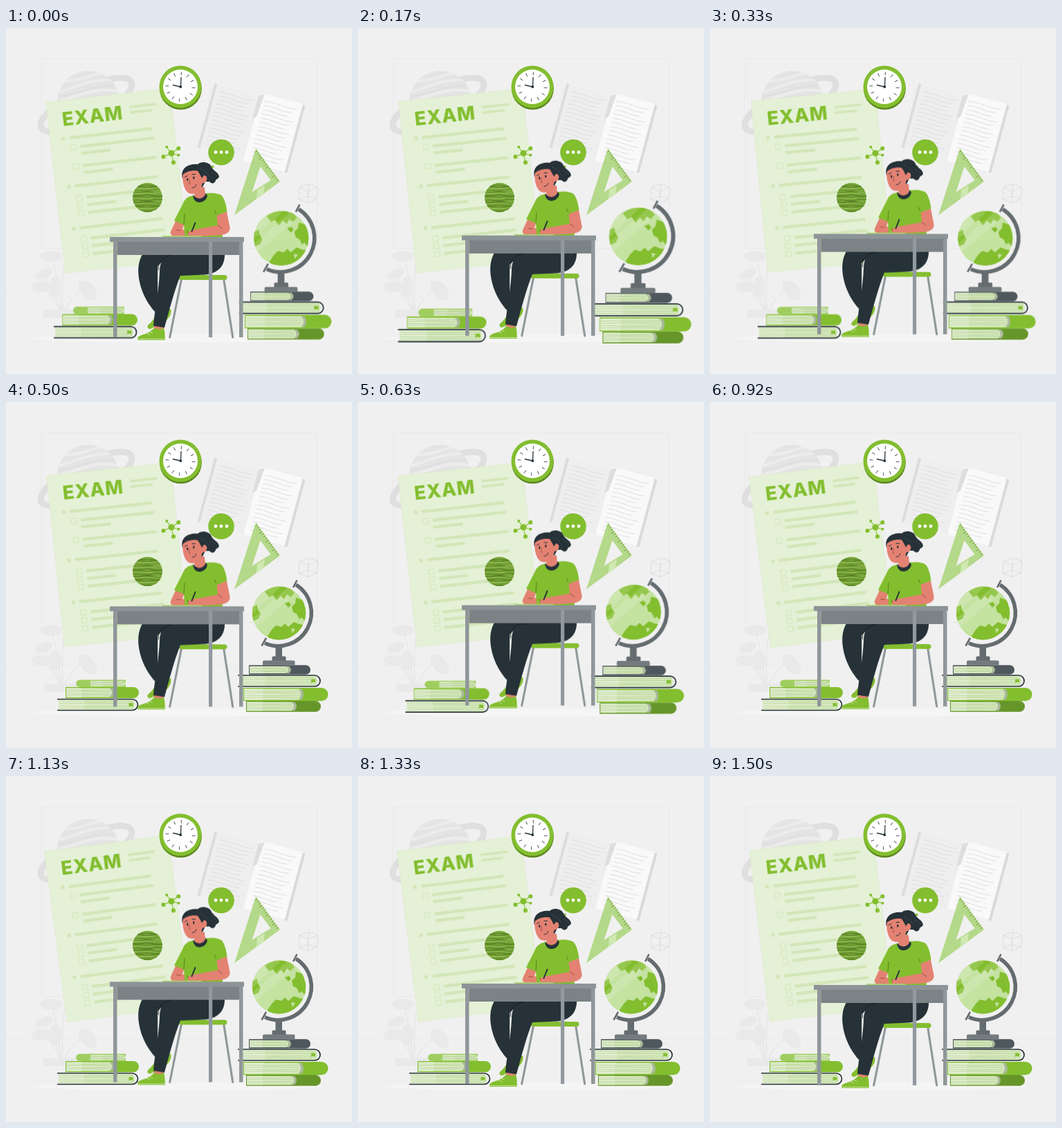
These frames come from a looping animation (500 px wide and 500 px high, 1.54 s). An HTML page:

```html
<!DOCTYPE html>
<html lang="en">
<head>
<meta charset="utf-8">
<title>Exam study</title>
<style>
  html, body { margin: 0; width: 100%; height: 100%; overflow: hidden; background: #f0f0f0; }
  svg { display: block; width: 100vw; height: 100vh; }
  #paper { transform-origin: 161.2px 220.7px; }
  #props { transform-origin: 270px 352.5px; }
  .title { font: 800 27.5px Inter, "Open Sans", sans-serif; letter-spacing: .9px; fill: #83be2f; }
  .g { fill: #83be2f; }
  .dark { fill: #263238; }
  .skin { fill: #e38272; }
  .ln { fill: none; stroke: #263238; stroke-linecap: round; }
</style>
</head>
<body>
<svg viewBox="0 0 500 500">
  <defs>
    <clipPath id="ballClip"><circle cx="204.5" cy="245" r="21.5"/></clipPath>
    <clipPath id="globeClip"><circle cx="394.5" cy="305" r="38.7"/></clipPath>
    <clipPath id="planetClip"><circle cx="119" cy="107" r="45"/></clipPath>
  </defs>

  <!-- backdrop -->
  <g fill="none" stroke="#e9e9e9">
    <path d="M50 44.5H449.5V318.5H50Z"/>
    <path d="M55 49V318M262 120V318M0 380.5H500" stroke="#ebebeb"/>
  </g>
  <g fill="#e4e4e4">
    <ellipse cx="116" cy="111" rx="73" ry="23" transform="rotate(-27 116 111)" fill="none" stroke="#dfdfdf" stroke-width="9"/>
    <circle cx="119" cy="107" r="45"/>
    <g clip-path="url(#planetClip)" fill="none" stroke="#ececec" stroke-width="4">
      <path d="M75 92C100 88 120 70 165 76M75 106C105 100 125 84 165 92M85 76C105 78 125 66 145 64"/>
      <path d="M75 99C105 96 130 80 165 84" stroke="#dedede" stroke-width="2"/>
    </g>
  </g>
  <g id="notebook" transform="translate(305 82) rotate(15)"></g>
  <g fill="#e9e9e9">
    <path d="M80 410C78 380 70 345 66 332M82 410C82 370 78 345 92 320M80 410C74 392 62 366 52 356M84 410C92 392 105 378 118 376M78 408C70 390 60 378 50 374" fill="none" stroke="#e2e2e2"/>
    <ellipse cx="65" cy="330" rx="16" ry="8"/>
    <ellipse cx="55" cy="355" rx="13" ry="7" transform="rotate(-20 55 355)"/>
    <ellipse cx="71" cy="374" rx="9" ry="15"/>
    <ellipse cx="50" cy="374" rx="13" ry="8"/>
    <ellipse cx="118" cy="379" rx="17" ry="10" transform="rotate(50 118 379)"/>
    <path d="M54 407H109V419H54Z"/>
  </g>
  <path d="M424 230L438 225.5L451 230L449 247L436 253L423 248ZM424 230L437 236L451 230M437 236L436 253M438 225.5L436 243L423 248M436 243L449 247" fill="none" stroke="#dedede"/>
  <ellipse cx="250" cy="448.5" rx="209" ry="6" fill="#f5f5f5"/>

  <g id="paper"><g id="sheet" transform="translate(57.5 107.5) rotate(-6.6)">
    <path d="M0 0H180V248.6H0Z" fill="#e4f1d6" stroke="#d9e8c4" stroke-width=".6"/>
    <text class="title" x="20.5" y="36.5">EXAM</text>
  </g></g>

  <!-- floating objects -->
  <g id="clock">
    <circle cx="252.4" cy="87.5" r="30.5" fill="#5b8620"/>
    <circle class="g" cx="252" cy="85" r="30.5"/>
    <circle cx="252" cy="85" r="25" fill="#fff"/>
    <path class="ln" d="M252.5 85L253 71.5M252 85L241.5 82.5" stroke-width="1.3"/>
    <circle class="dark" cx="252.3" cy="85" r="1.9"/>
  </g>
  <g id="ball" clip-path="url(#ballClip)">
    <circle cx="204.5" cy="245" r="21.5" fill="#78a838"/>
  </g>
  <g class="g">
    <path d="M239 181L227.5 186M239 181L249 174M239 181L242 194M239 181L232 172M239 181L250 184" stroke="#83be2f" stroke-width="1.1"/>
    <circle cx="239" cy="181" r="4.6"/><circle cx="227.5" cy="186" r="3"/>
    <circle cx="249.3" cy="174" r="3"/><circle cx="242" cy="194.3" r="3.1"/>
    <circle cx="232.3" cy="172" r="2"/><circle cx="249.5" cy="183.7" r="2"/>
  </g>
  <circle class="g" cx="311" cy="179.7" r="18.8"/>
  <circle class="g" cx="298.5" cy="200.5" r="2.1"/>
  <g fill="#fff"><circle cx="303" cy="179.5" r="2.4"/><circle cx="311" cy="179.5" r="2.4"/><circle cx="319" cy="179.5" r="2.4"/></g>
  <g id="ruler">
    <path d="M361 174L396 222L330 270.5ZM367.5 200L382.5 220L355.500 237Z" fill="#b4d98a" fill-rule="evenodd"/>
    <path d="M363 234L374 227.5L372 240L362 247Z" fill="#cfe8b0"/>
  </g>

  <g id="props">
    <g id="books"></g>
    <path d="M389.5 351H399V372H389.5Z" fill="#646c6f"/>
    <rect x="384.5" y="367.5" width="20" height="8" rx="1.5" fill="#646c6f"/>
    <rect x="371" y="373.6" width="46.5" height="7.3" rx="2" fill="#737b7e"/>
    <path d="M419 264A48 48 0 0 1 374 348.5" fill="none" stroke="#646c6f" stroke-width="5.5"/>
    <path d="M420.5 257.5L415 268M369.5 352.5L376 341" stroke="#646c6f" stroke-width="2.6"/>
    <g clip-path="url(#globeClip)">
      <circle cx="394.5" cy="305" r="38.7" fill="#c4e2a0"/>
      <g class="g">
        <path d="M374 274C386 265 402 264 412 270L417 276L411 282L406 278L402 285L397 280L391 287L386 279L380 282Z"/>
        <path d="M419 283L429 286C436 298 436 310 433 318L427 311L424 314L420 306L415 304L413 296L418 291Z"/>
        <path d="M403 291L409 289L412 293L408 297Z"/>
        <path d="M378 338L384 329L390 323L398 325L403 320L408 325L416 318L424 321L430 322L420 345H380Z"/>
        <path d="M354 297L363 293L364 300L368 306L365 313L357 317Z"/>
        <path d="M412 327L418 328L414 334Z" fill="#c4e2a0"/>
      </g>
      <path d="M350 312L402 262H350ZM356 330L428 268L414 262L350 318Z" fill="#fff" opacity=".15"/>
    </g>
  </g>

  <g id="student">
    <path d="M253.500 363L236.700 447M314.700 363L327.700 447" stroke="#8f979a" stroke-width="3.1" stroke-linecap="round"/>
    <rect class="g" x="249.500" y="357" width="70" height="7" rx="3.5"/>
    <!-- legs and shoes -->
    <path class="g" d="M228 408L238 406C240 413 236 419 228 426L208 435C203 434 203 430 209 426L217 416Z"/>
    <path class="dark" d="M199 324C189 338 190 356 194 371C198 387 207 401 215 410L219 404C219.5 385 219 362 219.300 344L240 324Z"/>
    <path class="skin" d="M214 428H229L228 436H214Z"/>
    <path class="g" d="M214 433.5L222 435.5L228 433.5C230 439 229.5 445 230 451H190.5C188.5 447.5 192 444.5 198 443C206 441 210 437.5 214 433.5Z"/>
    <path d="M190 449.5H230M203 441L208 444M207 438.5L212 441.5" fill="none" stroke="#d3e9b4" stroke-width=".9"/>
    <path class="dark" d="M240 324H316C317 342 309 354 288 356.5L252 358C243 380 236 408 229 433L213 430.5C215 405 221 380 222 352C222 338 228 329 240 324Z"/>
    <path d="M220.500 350C219 338 227 331 240 328" fill="none" stroke="#11191d" stroke-width=".8"/>
    <!-- torso and arms -->
    <path class="skin" d="M246 277L258 281L255 291L263 293L268 301H242C237 299 237 296 239 292Z"/>
    <path class="g" d="M272 242C263 243 258 247 256 253L243 278.500L257 284.500L258.500 302H313L309 270L319.500 265.500C318 254 315 243 309 240.500C303 238 295 238 287 239Z"/>
    <path d="M257 284L258 268M304 269L301 263" fill="none" stroke="#4d7319" stroke-width=".8"/>
    <path class="skin" d="M304.500 271L319 265.500L323.500 288C324.500 295 318 298.500 309 299.500L270 301.500L262 299C263 294 268 291 275 291L306 285Z"/>
    <path d="M306 285L313 290M246 292L253 292.5M264 297L262 293" fill="none" stroke="#8e4239" stroke-width=".8"/>
    <path class="ln" d="M273.5 281.5L268.5 294" stroke-width="2"/>
    <!-- head -->
    <path class="dark" d="M270 241C274 247 284 246 288 238.5L291 242C289 254 271 257 270 241Z"/>
    <path class="skin" d="M273 230H287L288 241C284 248 275 248 272 242Z"/>
    <path class="dark" d="M255 217C251.500 205 261 195.500 277 197C281 192.500 294 192.500 297 201C300 207 307 208 308 215C306 219 304 218 303 220C302 225 297 226 294 222L288 222L284 230Z"/>
    <path class="skin" d="M255.500 212C254.500 221 257 231 261 236C266 242.500 276 240 281 233L284 224C291 225 293 213 286 213L283 217C281 213 279 209 277 206.500C270 205 261 207 255.500 212Z"/>
    <path d="M280 203C285 205 290 208 293 214M296 208C300 210 304 212 305 215" fill="none" stroke="#4a555a" stroke-width=".6"/>
    <ellipse class="dark" cx="262.3" cy="219" rx="1.2" ry="1.9"/>
    <ellipse class="dark" cx="271.3" cy="216.5" rx="1.2" ry="1.9"/>
    <path class="ln" d="M258.5 215.5L262 213.5M269 211.5L273.5 211.5M269 231C272 231 274 229 275 226.5" stroke-width="1"/>
    <path d="M265.5 219L264.5 225.5L267 225" fill="none" stroke="#a34d42" stroke-width=".8"/>
    <!-- desk -->
    <path d="M226 300.3H283V302.5H226Z" fill="#a9d071"/>
    <path d="M155 309H160.5V447H155ZM337 309H342.5V447H337Z" fill="#8f979a"/>
    <path d="M160.5 309H337V328H160.5Z" fill="#7b8386"/>
    <path d="M293 309H298.2V447H293Z" fill="#9299a0"/>
    <path d="M150 302H344V309H150Z" fill="#8c9497"/>
  </g>
</svg>
<script>
const $ = id => document.getElementById(id);
const add = (id, markup) => $(id).insertAdjacentHTML('beforeend', markup);
const path = (d, attrs) => `<path d="${d}" ${attrs}/>`;
const bar = (x, y, w, h, fill) => `<rect x="${x}" y="${y}" width="${w}" height="${h}" fill="${fill}"/>`;

// Exam sheet rows: marker (bullet, box, none), centre height, end of the line
const rows = [
  ['dot', 55, 148], ['box', 69, 149.5], ['', 79, 85], ['box', 97, 149.5], ['', 107, 85],
  ['dot', 125, 148], ['box', 142.8, 149.5], ['box', 153.8, 85], ['box', 165.2, 149.5],
  ['dot', 186, 148], ['box', 202.3, 149.5], ['box', 213.5, 85], ['box', 225, 149.5]
];
const ink = '#d2e6b8';
add('sheet', bar(119, 18.8, 39, 3.6, ink) + bar(119, 26.8, 32, 3.6, ink) + rows.map(([kind, y, end]) => {
  const x = kind === 'dot' ? 28 : 42.5;
  const mark = kind === 'dot' ? bar(16.8, y - 2.5, 5, 5, ink)
    : kind ? path(`M28.5 ${y - 3.7}h7.6v7.6h-7.6z`, `fill="none" stroke="${ink}"`) : '';
  return mark + bar(x, y - 2.2, end - x, 4.4, ink);
}).join(''));

// Open notebook
const scribble = (x, y, w) => path(`M${x} ${y}q${w / 4} -1.5 ${w / 2} 0t${w / 2} 0`, 'fill="none" stroke="#dedede" stroke-width=".9"');
let pages = bar(-4, -1, 5, 96, '#dcdcdc') + bar(0, 0, 66, 95, '#eeeeee')
  + bar(126, -4, 5, 101, '#dadada') + bar(65, -5, 62, 101, '#f9f9f9')
  + path('M62 0L70 -5L67 30L62 34Z', 'fill="#dedede"');
for (let i = 0; i < 14; i++) {
  pages += scribble(6, 9 + i * 6, 50 - i % 4 * 3) + scribble(73, 5 + i * 6.3, 47 - i % 3 * 5);
}
add('notebook', pages);

// Clock ticks
for (let i = 0; i < 12; i++) {
  add('clock', path('M252 63.5v4.8', `stroke="#263238" stroke-width=".8" transform="rotate(${i * 30 + 4} 252 85)"`));
}

// Ball stripes
for (let i = 0; i < 18; i++) {
  const y = 225 + i * 2.4, s = i % 2 ? 1.5 : -1.5;
  add('ball', path(`M181 ${y}q8 ${s} 16 0t16 ${s / 2}t18 ${-s}`,
    `fill="none" stroke="${i % 3 ? '#5c8128' : '#8fb852'}" stroke-width="${.9 + i % 4 * .3}"`));
}

// Ruler ticks
for (let i = 1; i < 15; i++) {
  const x = 361 + i * 2.33, y = 174 + i * 3.2, k = i % 4 ? 1 : 1.7;
  add('ruler', path(`M${x} ${y}l${-2.6 * k} ${1.9 * k}`, 'stroke="#55801f" stroke-width=".8"'));
}

// Books: leaves with a shaded inner end, plus a solid or an outlined cover
function leaves(x, end, y, h) {
  let s = path(`M${x} ${y}H${end - 4}q6 ${h / 2} 0 ${h}H${x}z`, 'fill="#d7eabf"')
    + bar(x, y, (end - x) * .33, h, '#e2f0d0');
  for (let i = 1; i < 5; i++) {
    s += path(`M${x} ${y + h * i / 5}Q${(x + end) / 2} ${y + h * i / 5 + (i % 2 ? 1 : -1)} ${end - 3} ${y + h * i / 5}`,
      'fill="none" stroke="#abc68b" stroke-width=".6"');
  }
  return s;
}
function solid(x, end, y, h, split, fill) {
  const r = h / 2;
  return path(`M${x} ${y}H${end - r}a${r} ${r} 0 0 1 0 ${h}H${x}z`, `fill="${fill}"`)
    + path(`M${split - 5} ${y + 1.5}h3q6 ${r - 1.5} 0 ${h - 3}h-3z`, 'fill="#a9b99a"')
    + leaves(x + 1, split - 2, y + 1.6, h - 3.2);
}
function outlined(x, end, y, h) {
  const r = h / 2;
  return leaves(x + 2, end - 4, y + 1, h - 2)
    + path(`M${x} ${y + 1}H${end - r}a${r - 1} ${r - 1} 0 0 1 0 ${h - 2}H${x}`, 'fill="none" stroke="#263238" stroke-width="1.7"')
    + path(`M${end - 14} ${y + r - 2.5}h6v5.5l-3 -1.5l-3 1.5z`, 'class="g"');
}
add('books',
  path('M106.5 401.5H173V412H106.5a5.25 5.25 0 0 1 0 -10.5z', 'fill="#9fce5f"')
  + leaves(122, 174, 403, 7.6)
  + solid(86, 192, 412, 16, 156, '#83be2f')
  + outlined(74, 191.5, 428.5, 18)
  + solid(347, 455, 432, 15.8, 419, '#66962a')
  + solid(343, 465.5, 413, 19, 429, '#83be2f')
  + outlined(335, 455, 394, 18)
  + solid(351, 440, 380.3, 13.4, 411, '#4f585c'));

// Motion: 37 held steps per loop; key times in ms
const loop = 1540;
function play(id, keys, pose) {
  $(id).animate(
    keys.map(([t, v]) => ({ offset: t / loop, transform: pose(v) })),
    { duration: loop, delay: -5, iterations: Infinity, easing: 'steps(37)' });
}
play('student', [[0, 0], [715, -9.6], [1500, 0], [loop, 0]], v => `translateY(${v}px)`);
play('paper', [[0, .08], [345, 1], [1095, -1], [1500, -.1], [loop, .05]], v => `rotate(${v}deg)`);
play('props', [[0, 1.0255], [115, 1.1], [410, 1], [583, 1], [727, 1.1], [872, 1], [loop, 1]], v => `scale(${v})`);
</script>
</body>
</html>
```
